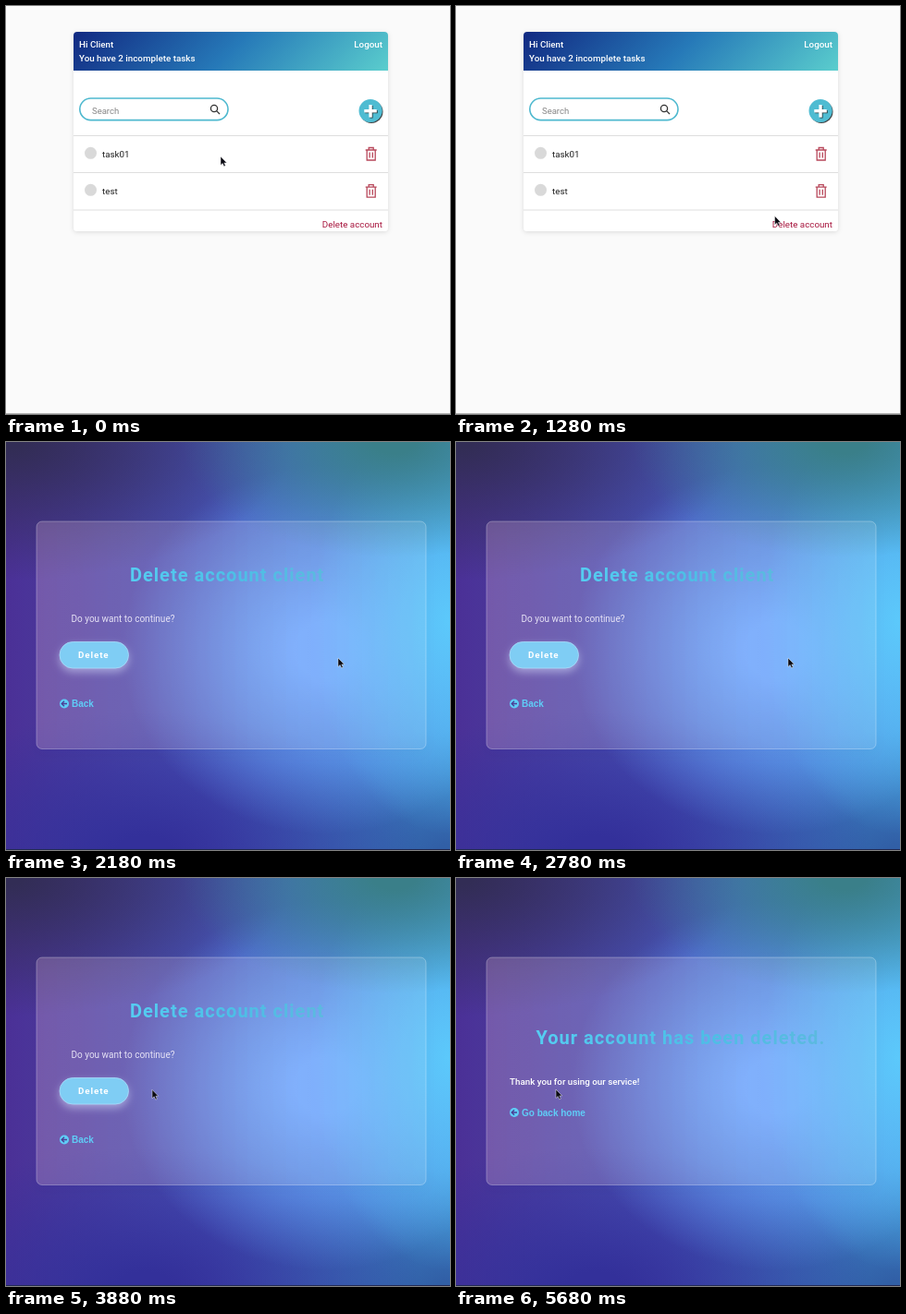
An HTML page for the animation above (8780 ms loop, 480 by 442 pixels).

```html
<!DOCTYPE html>
<html lang="en">
<head>
<meta charset="utf-8">
<title>Delete account</title>
<style>
  html, body { margin: 0; width: 100%; height: 100%; overflow: hidden; background: #fafafa; }
  #glow {
    position: absolute; inset: 0;
    background:
      radial-gradient(ellipse 230px 125px at 420px 0, #3a7f89 10%, transparent),
      radial-gradient(ellipse 310px 150px at 0 0, #322d55 5%, transparent),
      radial-gradient(ellipse 150px 230px at 480px 195px, #5cc9fb, transparent),
      radial-gradient(ellipse 220px 200px at 345px 225px, #6ba6ff 15%, transparent),
      radial-gradient(ellipse 300px 150px at 150px 442px, #33309a 10%, transparent),
      radial-gradient(ellipse 260px 130px at 480px 442px, #315fa6 5%, transparent),
      linear-gradient(90deg, #4b3096, #4752b5 45%, #4499db);
  }
  svg { position: absolute; inset: 0; width: 100%; height: 100%; display: block; }
  text { font: 9.8px Roboto, sans-serif; white-space: pre; }
  .medium { font-weight: 500; }
  .white { fill: #fff; }
  .red { fill: #a8173f; }
  .end { text-anchor: end; }
  .title { font-size: 20px; font-weight: 700; letter-spacing: 1px; fill: url(#titleInk); }
  .link { font: 700 10px "Liberation Sans", sans-serif; fill: #5fcdf7; }
</style>
</head>
<body>
<div id="glow"></div>
<svg viewBox="0 0 480 442">
  <defs>
    <linearGradient id="header" gradientUnits="userSpaceOnUse" x1="148" y1="-46" x2="338" y2="144">
      <stop stop-color="#122a82"/><stop offset=".5" stop-color="#2679b8"/><stop offset="1" stop-color="#5acdcd"/>
    </linearGradient>
    <linearGradient id="titleInk">
      <stop stop-color="#55cdf2"/><stop offset=".55" stop-color="#4cbfe6"/><stop offset="1" stop-color="#5cb9df"/>
    </linearGradient>
    <linearGradient id="pane">
      <stop stop-color="#ffd0e4" stop-opacity=".22"/><stop offset="1" stop-color="#fff" stop-opacity=".1"/>
    </linearGradient>
    <filter id="cardShadow" x="-10%" y="-10%" width="120%" height="120%">
      <feDropShadow dx="0" dy="1" stdDeviation="2.5" flood-opacity=".13"/>
    </filter>
    <filter id="paneShadow" x="-10%" y="-10%" width="120%" height="125%">
      <feDropShadow dx="0" dy="4" stdDeviation="6" flood-color="#102060" flood-opacity=".18"/>
    </filter>
    <filter id="buttonGlow" x="-30%" y="-50%" width="160%" height="220%">
      <feDropShadow dx="0" dy="4" stdDeviation="4" flood-color="#d9e4ff" flood-opacity=".5"/>
    </filter>
    <filter id="hardShadow" x="-20%" y="-20%" width="150%" height="150%">
      <feDropShadow dx="1" dy="1" stdDeviation=".4" flood-color="#222" flood-opacity=".85"/>
    </filter>
    <g id="trash" fill="none" stroke="#b8485b" stroke-width="1.3">
      <path d="M-6 -4.5H6M-2.5 -4.5V-7H2.5V-4.5M-4.5 -4.5V6.5H4.5V-4.5M-1.6 -2V4M1.6 -2V4"/>
    </g>
    <g id="backIcon">
      <circle r="5" fill="#5fcdf7"/>
      <path d="M3 0H-2.6M0 -2.8L-2.8 0L0 2.8" fill="none" stroke="#4c4095" stroke-width="1.4"/>
    </g>
  </defs>

  <g id="list">
    <rect x="73" y="28" width="340" height="216" rx="4" fill="#fff" filter="url(#cardShadow)"/>
    <path d="M73 70V32a4 4 0 0 1 4 -4H409a4 4 0 0 1 4 4V70Z" fill="url(#header)"/>
    <text class="medium white" x="79" y="45.3">Hi Client</text>
    <text class="medium white" x="79" y="60">You have 2 incomplete tasks</text>
    <text class="medium white end" x="407" y="45.3">Logout</text>
    <rect x="79.8" y="100" width="160.2" height="23.6" rx="11.8" fill="#fff" stroke="#4fb9cf" stroke-width="1.6"/>
    <text x="93" y="117" fill="#858585" style="font-size:9.5px">Search</text>
    <g fill="none" stroke="#333" stroke-width="1.3">
      <circle cx="225" cy="111" r="3.6"/><path d="M227.6 113.6L231 117"/>
    </g>
    <circle cx="394" cy="113.5" r="12.5" fill="#4fbcd2" filter="url(#hardShadow)"/>
    <path d="M394 107V120.400M387.300 113.700H400.700" stroke="#fff" stroke-width="3.2" filter="url(#hardShadow)"/>
    <path d="M73 140.500H413M73 180.500H413M73 221H413" stroke="#dedede"/>
    <g fill="#d9d9d9"><circle cx="91.5" cy="159.300" r="6.500"/><circle cx="91.5" cy="199.300" r="6.500"/></g>
    <g fill="#222"><text x="104" y="163.700">task01</text><text x="104" y="203.700">test</text></g>
    <use href="#trash" x="394.700" y="160.500"/>
    <use href="#trash" x="394.700" y="200.700"/>
    <text class="red end" x="407" y="240">Delete account</text>
    <path d="M0 441.500H480" stroke="#b5b5b5"/>
  </g>

  <g id="glass">
    <rect x="33" y="86" width="421" height="246.500" rx="6" fill="url(#pane)" stroke="#fff" stroke-opacity=".28" filter="url(#paneShadow)"/>
    <path d="M0 441.500H480" stroke="#222b55"/>
  </g>

  <g id="confirm">
    <text class="title" x="134" y="150.500">Delete account client</text>
    <text x="70.500" y="194.500" fill="#e6e2f5" style="font-size:10px">Do you want to continue?</text>
    <rect x="58" y="216.500" width="74.500" height="28.500" rx="14.250" fill="#7fcdf4" stroke="#a9dcfa" stroke-width=".8" filter="url(#buttonGlow)"/>
    <text class="white" x="78" y="234.300" style="font-weight:700;letter-spacing:.9px">Delete</text>
    <use href="#backIcon" x="63" y="283.500"/>
    <text class="link" x="71" y="287.200">Back</text>
  </g>

  <g id="done">
    <text class="title" x="86.500" y="179.500">Your account has been deleted.</text>
    <text class="medium white" x="58" y="223.700">Thank you for using our service!</text>
    <use href="#backIcon" x="63" y="254"/>
    <text class="link" x="71" y="257.500">Go back home</text>
  </g>

  <path id="cursor" d="M0 0V9.500L2.200 7.500L3.700 10.800L5.300 10.100L3.900 6.900H6.700Z" fill="#0a0a12" stroke="#fff" stroke-opacity=".75" stroke-width=".6"/>
</svg>
<script>
  const LOOP = 8780, CONFIRM_AT = 2180, DONE_AT = 5680, STEP = 100;
  const moves = [
    { start: 780, end: 1680, rest: [232, 163], from: [286, 197], to: [359, 235] },
    { start: 3480, end: 4380, rest: [359, 234], from: [270, 230], to: [108, 229] },
  ];
  const byId = id => document.getElementById(id);
  const show = (id, visible) => { byId(id).style.display = visible ? '' : 'none'; };
  const easeOut = p => 1 - (1 - p) ** 2;

  // The pointer is refreshed every STEP while it travels.
  function pointerAt(t) {
    const { start, end, rest, from, to } = moves[t < CONFIRM_AT ? 0 : 1];
    if (t < start) return rest;
    const elapsed = Math.floor((t - start) / STEP) * STEP;
    const p = easeOut(Math.min(1, elapsed / (end - start)));
    return from.map((v, i) => v + (to[i] - v) * p);
  }

  function draw(now) {
    const t = now % LOOP, deleting = t >= CONFIRM_AT, deleted = t >= DONE_AT;
    show('list', !deleting);
    show('glow', deleting);
    show('glass', deleting);
    show('confirm', deleting && !deleted);
    show('done', deleted);
    byId('cursor').setAttribute('transform', `translate(${pointerAt(t)})`);
  }

  const startTime = performance.now();
  function tick() {
    draw(performance.now() - startTime);
    requestAnimationFrame(tick);
  }
  tick();
</script>
</body>
</html>
```
